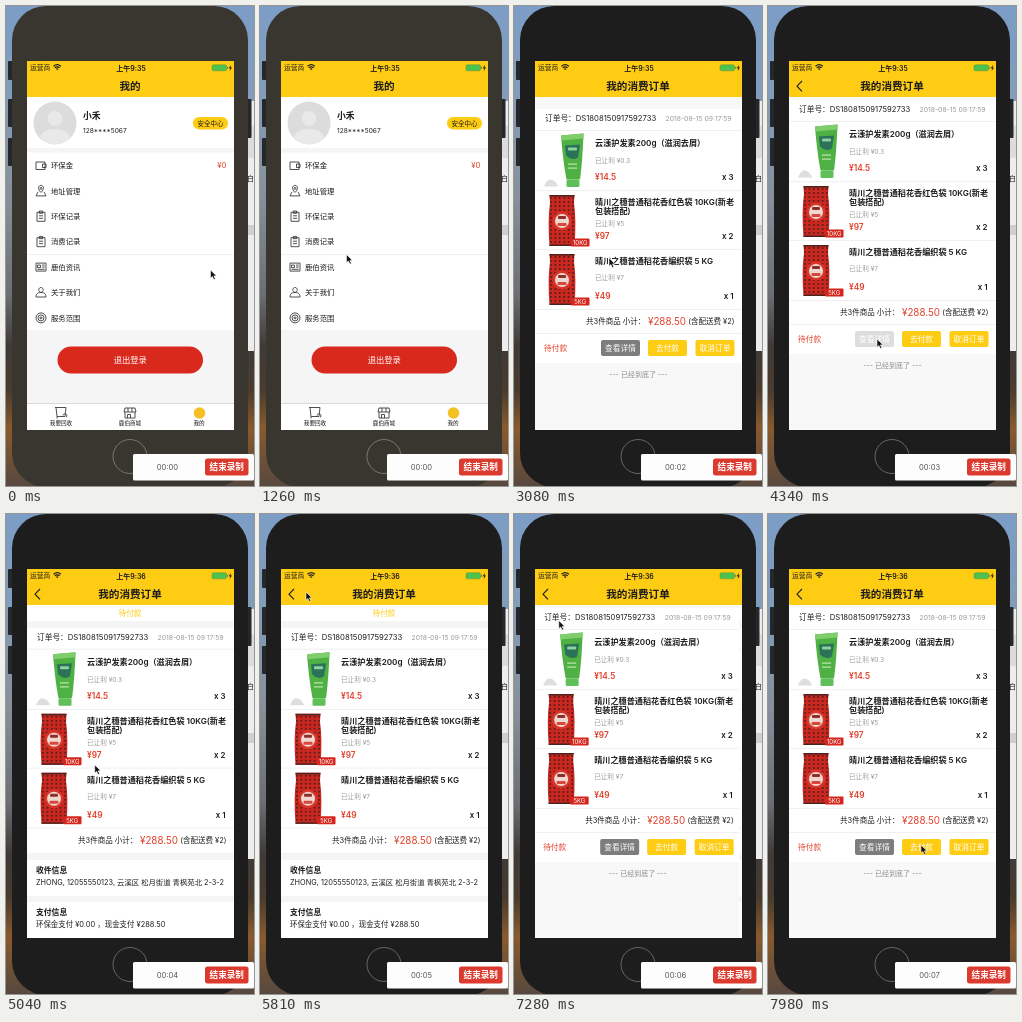
These frames come from a looping animation (248x480 px, 8 s). An HTML page:

```html
<!DOCTYPE html>
<html lang="zh-CN">
<head>
<meta charset="utf-8">
<title>我的消费订单</title>
<style>
html, body { margin: 0; width: 100%; height: 100%; overflow: hidden; background: #333; }
svg { display: block; width: 100%; height: 100%; }
text { font-family: Inter, "Noto Sans CJK SC", "Noto Sans CJK", sans-serif; }
</style>
</head>
<body>
<svg id="stage" viewBox="0 0 248 480" xmlns="http://www.w3.org/2000/svg"></svg>
<script>
const LOOP = 8000;
const YELLOW = '#ffcc14', RED = '#d9281c', PRICE = '#e2412c', INK = '#1c1c1c', GREY = '#999', PAPER = '#f8f8f8';

const rect = (x, y, w, h, fill, r = 0, more = '') =>
  `<rect x="${x}" y="${y}" width="${w}" height="${h}" rx="${r}" fill="${fill}" ${more}/>`;
const circle = (x, y, r, fill, more = '') => `<circle cx="${x}" cy="${y}" r="${r}" fill="${fill}" ${more}/>`;
const path = (d, fill = 'none', more = '') => `<path d="${d}" fill="${fill}" ${more}/>`;
const group = (id, body) => `<g id="${id}">${body}</g>`;
// y is the optical middle of the line
const text = (x, y, size, str, fill = INK, weight = 400, anchor = 'start', id = '') =>
  `<text x="${x}" y="${y + size * .36}" font-size="${size}" fill="${fill}" font-weight="${weight}" text-anchor="${anchor}"${id && ` id="${id}"`}>${str}</text>`;
const line = y => rect(21, y, 207, .6, '#e6e6e6');

function button(x, y, w, h, fill, label, size, r, color = '#fff', weight = 400, id = '') {
  const body = rect(x, y, w, h, fill, r) + text(x + w / 2, y + h / 2, size, label, color, weight, 'middle');
  return id ? group(id, body) : body;
}

function desktop() {
  const sky = `<linearGradient id="sky" x2="0" y2="1">
    <stop offset="0" stop-color="#7c9dc6"/><stop offset=".18" stop-color="#829dbb"/>
    <stop offset=".4" stop-color="#87909b"/><stop offset=".6" stop-color="#6c6f74"/>
    <stop offset=".71" stop-color="#3f3a37"/><stop offset=".8" stop-color="#4a3b2e"/>
    <stop offset=".88" stop-color="#8a5a2c"/><stop offset="1" stop-color="#57483f"/></linearGradient>`;
  return `<defs>${sky}</defs>` + rect(0, 0, 248, 480, 'url(#sky)') +
    rect(238, 95, 10, 250, '#ededed') + rect(238, 120, 10, 32, '#dcdcdc') +
    rect(238, 219, 10, 10, '#cfcfcf') + text(241, 172, 7, '白');
}

function phone() {
  const keys = [[2, 55, 19], [2, 93, 28], [2, 132, 28], [240, 93, 39]]
    .map(([x, y, h]) => rect(x, y, 5.5, h, '#25272a', 1)).join('');
  return keys + rect(6, 0, 236, 481, INK, 34, 'id="shell"') +
    circle(124, 450.5, 17, 'none', 'id="home" stroke="#666" stroke-width="1"');
}

// Line icons drawn around 0,0
const icons = [
  'M-5-3.5H4V4H-5ZM4-1.5H1.5V2H5V-1.5Z',
  'M0 1.5C-4-2-2.5-5.5 0-5.5S4-2 0 1.5ZM-1-2.5A1 1 0 1 1 1-2.5A1 1 0 1 1-1-2.5M-3 1L-5 5H5L3 1',
  'M-4-4H4V5H-4ZM-1.7-5.3H1.7V-3H-1.7ZM-2-.5H2M-2 2H2',
  'M-4-4H4V5H-4ZM-1.7-5.3H1.7V-3H-1.7ZM-2-.5H2M-2 2H2',
  'M-5-4H5V4H-5ZM-3.5-2H-.5V.5H-3.5ZM1-2H3.7M1 0H3.7M-3.5 2.2H3.7',
  'M0 0C-3.5-1-2.5-5 0-5S3.5-1 0 0C-4 0-5 2-5 4.5H5C5 2 4 0 0 0',
  'M-5 0A5 5 0 1 1 5 0A5 5 0 1 1-5 0M-3 0A3 3 0 1 1 3 0A3 3 0 1 1-3 0M-1 0A1 1 0 1 1 1 0A1 1 0 1 1-1 0'
];
const icon = (d, x, y) =>
  path(d, 'none', `stroke="#3c3c3c" stroke-width=".9" stroke-linejoin="round" transform="translate(${x} ${y})"`);

function profile() {
  const rows = ['环保金', '地址管理', '环保记录', '消费记录', '鹿伯资讯', '关于我们', '服务范围'];
  const menu = rows.map((label, i) => {
    const y = 159.5 + i * 25.4;
    return icon(icons[i], 35, y) + text(45, y, 7.35, label);
  }).join('');
  const tabs = icon('M-6-5H5L4 4H-4L-5-5M2 3A2 2 0 1 1 5 5M-4 4V6', 55, 406.5) +
    icon('M-5-5H5L6-1H-6ZM-5-1V5H5V-1M-2.5 5V1.5H.5V5M2-5V-1M-2-5V-1', 124, 407) +
    circle(193.5, 407, 5.8, '#f5c021');
  const names = ['我要回收', '鹿伯商城', '我的'].map((s, i) => text(55 + i * 69, 417, 5.6, s, INK, 400, 'middle')).join('');
  return rect(21, 91, 207, 333, '#f5f5f5') + rect(21, 91, 207, 51, '#fff') +
    circle(49, 117, 21.5, '#dcdcdc') +
    path('M49 105a7 7 0 0 1 0 15a7 7 0 0 1 0-15M34 132C35 120 63 120 64 132A21.5 21.5 0 0 1 34 132', '#e9e9e9') +
    text(77, 109.5, 8.8, '小禾', INK, 600) + text(77, 125, 6.6, '128****5067') +
    button(187, 111, 35, 12.5, YELLOW, '安全中心', 6.5, 6.2, INK, 500) +
    rect(21, 146.5, 207, 177.5, '#fff') + line(248) + menu +
    text(220.5, 159.5, 7.8, '¥0', PRICE, 400, 'end') +
    button(51.5, 340.5, 145.5, 27, RED, '退出登录', 8.3, 13.5, '#fff', 500) +
    rect(21, 397, 207, 27, '#fff') + rect(21, 397, 207, .7, '#c9c9c9') + tabs + names;
}

function tube(y) {
  return path(`M47 ${y + 2}L69.5 ${y}Q68.5 ${y + 28} 66 ${y + 46}H52.5Q49 ${y + 28} 47 ${y + 2}Z`, '#4fb043') +
    path(`M47 ${y + 2}L69.5 ${y}V${y + 5}L47.4 ${y + 7}Z`, '#7fce6c') +
    path(`M51 ${y + 12}L66 ${y + 11}L64 ${y + 24}Q58 ${y + 28} 52 ${y + 22}Z`, '#2a7258') +
    rect(54, y + 14, 9, 3, '#8fd0a0', 1) + rect(54, y + 30, 9, 1.2, '#bfe8b0') + rect(54, y + 34, 9, 1.2, '#bfe8b0') +
    rect(52.5, y + 46, 13, 7.5, '#5fc05a', 1.5) +
    path(`M30 ${y + 53}Q33 ${y + 45} 37 ${y + 46}Q42 ${y + 47} 44 ${y + 53}Z`, '#dedede');
}

function bag(y, label) {
  let dots = '';
  for (let i = 0; i < 72; i++) {
    dots += circle(37 + (i % 6) * 4.4, y + 3 + Math.floor(i / 6) * 4, 1, '#56201c');
  }
  return path(`M35.5 ${y}H60.5L60 ${y + 8}Q62.5 ${y + 25} 60.5 ${y + 51}H35.5Q33.5 ${y + 25} 36 ${y + 8}Z`, '#c9271f') +
    dots + rect(35.5, y, 25, 1.5, '#4a2320') + rect(35.5, y + 49.5, 25, 1.5, '#4a2320') +
    circle(48, y + 26, 9.5, '#d8352b') + circle(48, y + 26, 7, '#eed9d0') +
    rect(44, y + 21, 8, 3, '#8d3029', 1) + rect(43.5, y + 28, 9, 3, '#d9473c', 1) +
    rect(57, y + 43.5, 18.5, 8, '#d5251c', 1) + text(66.2, y + 47.7, 6, label, '#fff', 400, 'middle');
}

function item(y, lines, off, price, count, dOff, dPrice) {
  return lines.map((s, i) => text(81, y + i * 9.5, 8.15, s, INK, 600)).join('') +
    text(81, y + dOff, 6.6, '已让利 ¥' + off, GREY) +
    text(81, y + dPrice, 8.3, '¥' + price, PRICE, 600) +
    text(219.5, y + dPrice, 7.9, 'x ' + count, INK, 600, 'end');
}

// The order block shared by list and detail
function order() {
  return rect(21, 94, 207, 225, '#fff') +
    text(31, 103.5, 7.7, '订单号：DS1808150917592733') +
    text(217.5, 103.5, 6.8, '2018-08-15 09:17:59', GREY, 400, 'end') +
    line(115) + tube(118.5) + item(128, ['云漾护发素200g（滋润去屑）'], '0.3', '14.5', 3, 18, 34) +
    line(175.5) + bag(180, '10KG') +
    item(187, ['晴川之穗普通稻花香红色袋 10KG(新老', '包装搭配)'], '5', '97', 2, 21.5, 34.5) +
    line(234) + bag(239, '5KG') + item(246, ['晴川之穗普通稻花香编织袋 5 KG'], '7', '49', 1, 17, 35) +
    line(294) + text(72, 306.5, 7.5, '共3件商品 小计：') +
    text(134, 306.5, 9.8, '¥288.50', PRICE) + text(220.5, 306.5, 7.5, '(含配送费 ¥2)', INK, 400, 'end');
}

function list() {
  return rect(21, 91, 207, 333, PAPER) + group('rows',
    order() + rect(21, 318, 207, 30, '#fff') + line(318) +
    text(30, 333, 7.7, '待付款', PRICE) +
    button(87, 325, 39, 16, '#7d7d7d', '查看详情', 7.7, 2, '#fff', 400, 'more') +
    button(134, 325, 39, 16, YELLOW, '去付款', 7.7, 2) +
    button(181.5, 325, 39, 16, YELLOW, '取消订单', 7.7, 2) +
    text(124.5, 359, 7, '--- 已经到底了 ---', '#8a8a8a', 400, 'middle'));
}

function detail() {
  return rect(21, 91, 207, 333, '#f5f5f5') + rect(21, 91, 207, 16, '#fff') +
    text(124, 99.5, 7.7, '待付款', YELLOW, 400, 'middle') +
    `<g transform="translate(0 19.8)">${order()}</g>` +
    rect(21, 346, 207, 36, '#fff') +
    text(30, 356.5, 7.8, '收件信息', INK, 600) +
    text(30, 368, 7.35, 'ZHONG, 12055550123, 云溪区 松月街道 青枫苑北 2-3-2') +
    rect(21, 388, 207, 36, '#fff') +
    text(30, 398.5, 7.8, '支付信息', INK, 600) +
    text(30, 410.5, 7.45, '环保金支付 ¥0.00 ，现金支付 ¥288.50');
}

function header() {
  const wifi = 'M47.5 60.2Q51.2 57 54.9 60.2M48.8 61.8Q51.2 59.8 53.6 61.8M50.3 63.4Q51.2 62.6 52.1 63.4';
  return rect(21, 55, 207, 36, YELLOW) +
    text(24, 62, 6.8, '运营商') + path(wifi, 'none', `stroke="${INK}" stroke-width="1.2"`) +
    text(125, 62, 7, '', INK, 600, 'middle', 'clock') +
    rect(206, 58.8, 14.5, 6, '#4bc44f', 1.5, 'stroke="#6b8a34" stroke-width=".5"') +
    rect(221.2, 60.6, 1, 2.4, '#6b8a34') + path('M225 58.8L222.8 62.2H224.2L223.6 65L226 61.4H224.5Z', INK) +
    text(124, 80.5, 10.6, '我的', INK, 600, 'middle', 'titleA') +
    text(124, 80.5, 10.6, '我的消费订单', INK, 600, 'middle', 'titleB') +
    path('M34 75L29 80.2L34 85.4', 'none', `id="back" stroke="${INK}" stroke-width="1.1"`);
}

function recorder() {
  return rect(127, 448, 121, 26.5, '#fdfdfd', 1.5) + text(161.5, 461.5, 7.6, '', '#555', 400, 'middle', 'timer') +
    button(199, 452.5, 43.5, 17, '#dc3a2e', '结束录制', 8.6, 2.5, '#fff', 600);
}

const stage = document.getElementById('stage');
stage.innerHTML = desktop() + phone() +
  '<clipPath id="screen"><rect x="21" y="55" width="207" height="369"/></clipPath>' +
  `<g clip-path="url(#screen)">${group('profile', profile()) + group('list', list()) + group('detail', detail()) + header()}</g>` +
  recorder() +
  path('M0 0V8.2L1.9 6.5L3.4 9.6L4.9 8.9L3.4 5.9H6Z', '#111', 'id="cursor" stroke="#fff" stroke-width=".6"');

const $ = id => document.getElementById(id);
const span = (t, a, b) => Math.min(1, Math.max(0, (t - a) / (b - a)));
const smooth = (t, a, b) => { const k = span(t, a, b); return k * k * (3 - 2 * k); };
// Page pushes start fast and settle gently
const slide = (t, a) => 1 - (1 - span(t, a, a + 500)) ** 3;

// time, x, y of the pointer tip
const trail = [
  [0, 204.5, 264], [420, 204.5, 264], [1260, 86.5, 248.5], [1680, 86, 237], [2450, 86, 237],
  [2950, 95, 252], [3300, 95, 252], [4050, 109, 333], [4700, 109, 333],
  [5600, 46, 78], [6200, 46, 78], [6650, 32, 80], [7150, 32, 80], [7800, 153, 331], [LOOP, 153, 331]
];
function pointer(t) {
  const i = trail.findIndex(p => p[0] > t), a = trail[i - 1], b = trail[i];
  const k = smooth(t, a[0], b[0]);
  return [a[1] + (b[1] - a[1]) * k, a[2] + (b[2] - a[2]) * k];
}

function move(id, x, y = 0) { $(id).setAttribute('transform', `translate(${x} ${y})`); }
function fade(id, o) { $(id).setAttribute('opacity', o); }

function draw(t) {
  const toList = slide(t, 2400);
  const toDetail = slide(t, 4430) - slide(t, 6900);
  const dark = toList > .5;
  move('profile', -62 * toList);
  move('list', 207 * (1 - toList) - 62 * toDetail);
  move('detail', 207 * (1 - toDetail));
  move('rows', 0, 9 * (1 - smooth(t, 3080, 3300)));
  fade('titleA', 1 - toList);
  fade('titleB', toList);
  fade('back', smooth(t, 3080, 3250));
  fade('more', 1 - .75 * (smooth(t, 4200, 4280) - smooth(t, 4430, 4650)));
  $('shell').setAttribute('fill', dark ? '#1d1d1d' : '#38362f');
  $('home').setAttribute('stroke', dark ? '#666' : '#77766f');
  $('clock').textContent = t < 5000 ? '上午9:35' : '上午9:36';
  $('timer').textContent = '00:0' + Math.max(0, Math.floor((t - 600) / 1000));
  move('cursor', ...pointer(t));
}

const start = performance.now();
function tick() {
  draw((performance.now() - start) % LOOP);
  requestAnimationFrame(tick);
}
tick();
</script>
</body>
</html>
```
